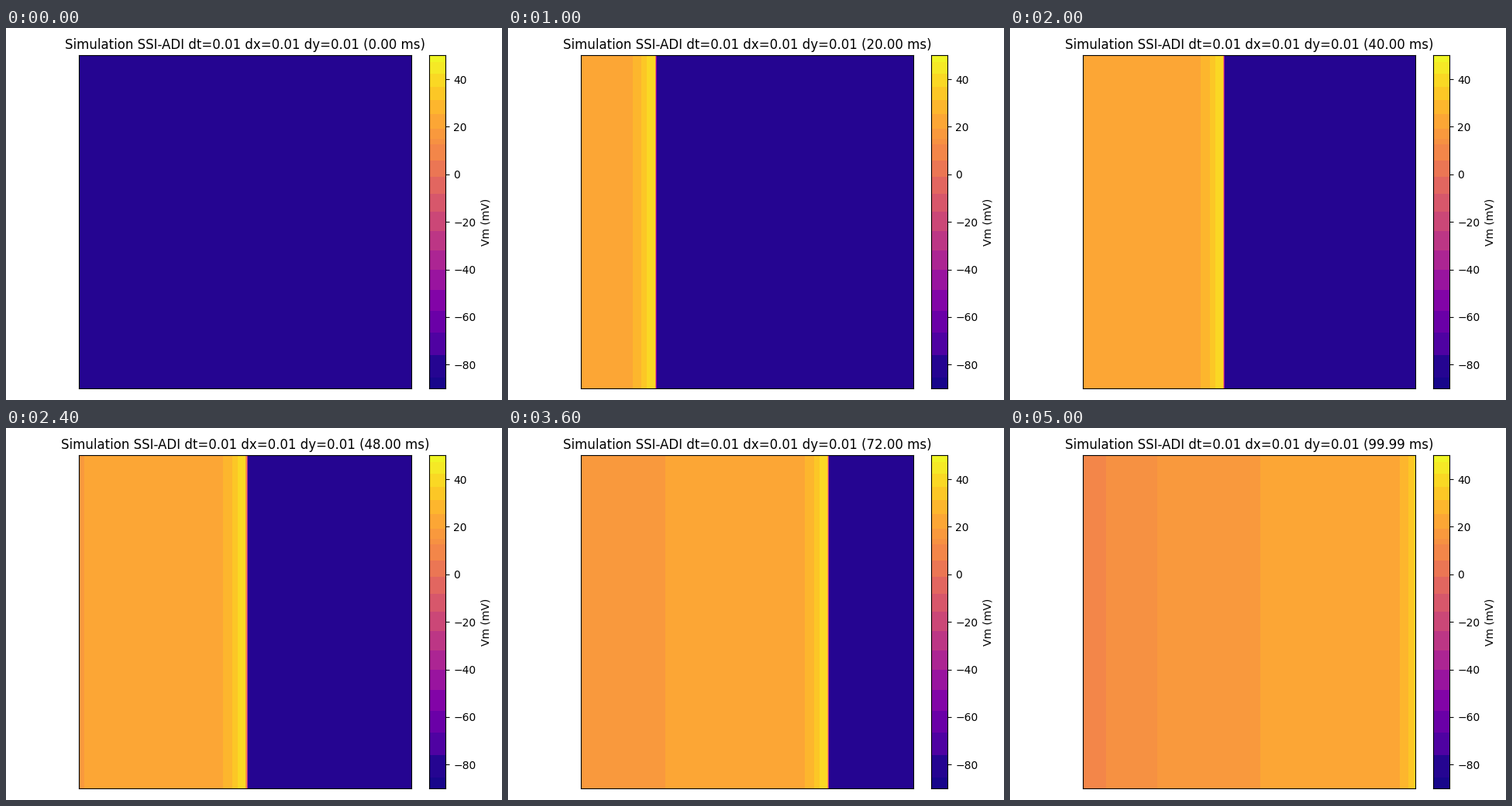
Recreate the animation shown at these times as a matplotlib script. Size 640 px wide and 480 px high, loop 5.1 s.

```python
import numpy as np
import matplotlib.pyplot as plt
from matplotlib.animation import FuncAnimation

W, H, DPI = 640, 480, 100
FRAMES, INTERVAL = 51, 100
V_MIN, V_MAX = -90, 50
REST = -84.5

# Layout in pixels, measured from the top left
LEFT, RIGHT, TOP, BOTTOM = 93.8, 523.4, 35.33, 465.0
BAR_LEFT = 546.0
BAR_WIDTH = (BOTTOM - TOP) / 20

# Wave front: pixel position at 0 ms and speed in pixels per ms
FRONT_START, SPEED = 105.8, 4.258

# Colour steps widen towards low potentials, with one finer step in the orange
k = np.arange(19)
EDGES = np.sort(np.append(47.2 - 5 * k - 0.132 * k**2, 14.6))
bounds = np.concatenate([[V_MIN], EDGES, [V_MAX]])
levels = (bounds[:-1] + bounds[1:]) / 2
levels[np.searchsorted(EDGES, REST)] = REST
COLORS = plt.get_cmap("plasma")((levels - V_MIN) / (V_MAX - V_MIN))[:, :3]


def banded(volts):
    return COLORS[np.digitize(volts, EDGES)]


def add_axes(left, width):
    return fig.add_axes([left / W, 1 - BOTTOM / H, width / W, (BOTTOM - TOP) / H])


def potential(t):
    """Steep upstroke at the front, a short peak, then a slowly falling plateau."""
    x = np.arange(94, 523) + 0.5
    if t == 0:
        return np.full(x.shape, REST)
    dist = FRONT_START + SPEED * t - x
    behind = np.maximum(dist, 0)
    active = 25.7 - 0.0325 * behind + 14 * np.exp(-(behind / 19.4) ** 3)
    upstroke = np.clip((dist + 1.2) / 2.4, 0, 1)
    return REST + (active - REST) * upstroke


plt.rcParams["font.family"] = "DejaVu Sans"
fig = plt.figure(figsize=(W / DPI, H / DPI), dpi=DPI, facecolor="white")

ax = add_axes(LEFT, RIGHT - LEFT)
ax.set_xticks([])
ax.set_yticks([])
field = ax.imshow(banded(potential(0))[None], aspect="auto",
                  interpolation="nearest", extent=(0, 1, 0, 1))
title = ax.set_title("", fontsize=12, pad=6)

bar = add_axes(BAR_LEFT, BAR_WIDTH)
scale = np.linspace(V_MIN, V_MAX, 859)[1::2]
bar.imshow(banded(scale)[:, None], aspect="auto", origin="lower",
           interpolation="nearest", extent=(0, 1, V_MIN, V_MAX))
bar.set_xticks([])
bar.yaxis.tick_right()
bar.yaxis.set_label_position("right")
bar.set_yticks(range(-80, 41, 20))
bar.set_ylabel("Vm (mV)")


def draw(i):
    t = min(2.0 * i, 99.99)
    field.set_data(banded(potential(t))[None])
    title.set_text(f"Simulation SSI-ADI dt=0.01 dx=0.01 dy=0.01 ({t:.2f} ms)")
    return field, title


anim = FuncAnimation(fig, draw, frames=FRAMES, interval=INTERVAL,
                     repeat=True, repeat_delay=0, blit=False)
plt.show()
```
